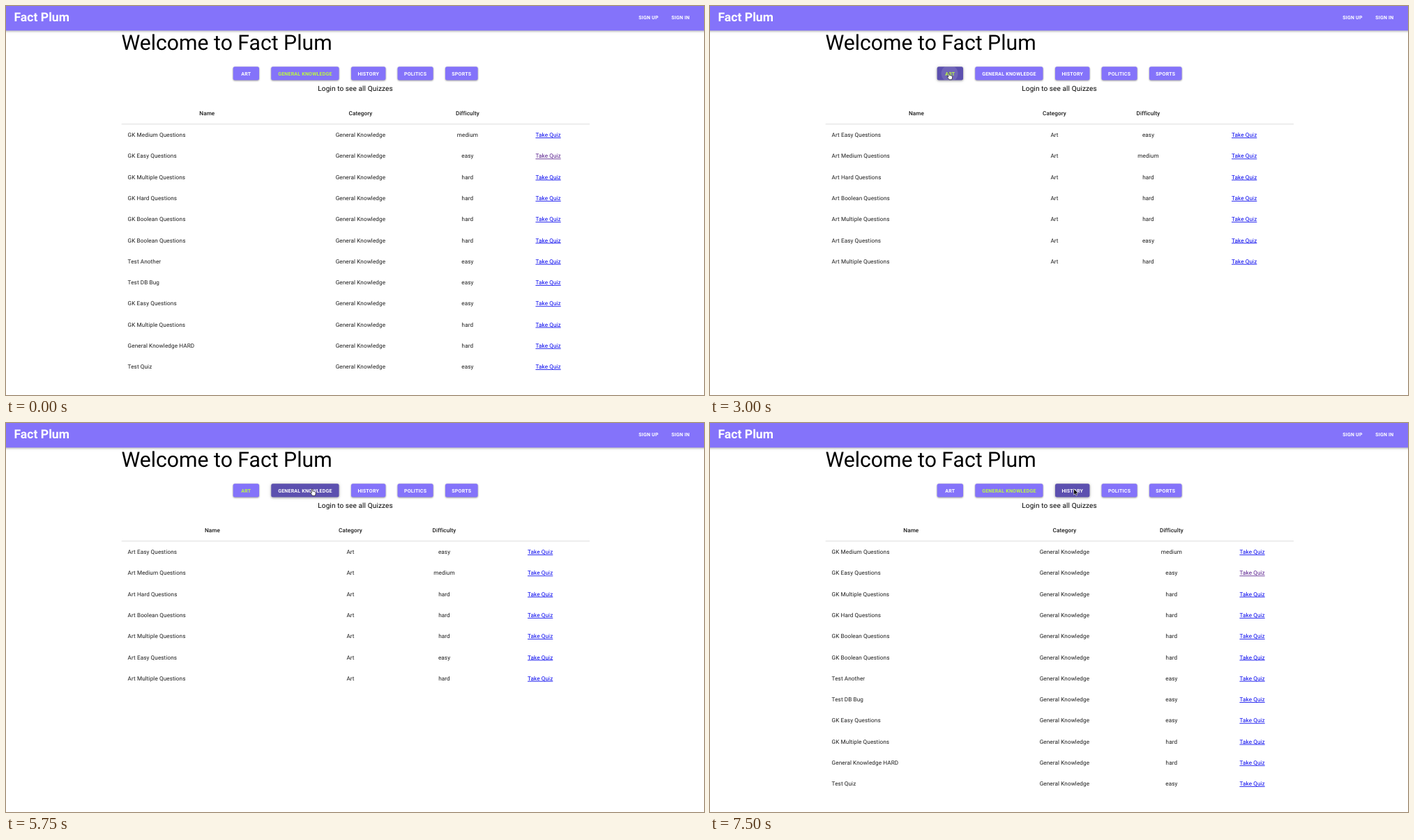
Recreate the animation shown at these times as an HTML page. Size 1001 px wide and 559 px high, loop 8000 ms.

```html
<!DOCTYPE html>
<html lang="en">
<head>
<meta charset="utf-8">
<title>Fact Plum</title>
<style>
  html, body { margin: 0; width: 100%; height: 100%; overflow: hidden; background: #fff; }
  svg { display: block; }
  text { font: 8.19px Roboto, sans-serif; letter-spacing: .088px; fill: #1c1c1c; text-rendering: geometricPrecision; }
  .mid { text-anchor: middle; }
  .th { font-weight: 500; }
  .link { fill: #00e; text-decoration: underline; }
  .seen { fill: #551a8b; }
  .brand { font-size: 17.6px; font-weight: 700; fill: #fff; letter-spacing: 0; }
  .title { font-size: 30.2px; fill: #000; letter-spacing: 0; }
  .note { font-size: 10.05px; fill: #000; letter-spacing: .094px; }
  .caps { font-size: 7.06px; font-weight: 700; fill: #fff; letter-spacing: .2px; }
  .on { fill: #bcfb40; }
  .bar { fill: #8473fa; filter: drop-shadow(0 1.4px 1.5px #0004) drop-shadow(0 .6px 2px #0002); }
  .btn { fill: #8473fa; filter: drop-shadow(0 1.2px .8px #0005) drop-shadow(0 .5px 1.2px #0002); }
  .fade { fill: #7062d5; }
  .hover { fill: #5c50af; filter: drop-shadow(0 1.8px 1.5px #0005) drop-shadow(0 .6px 2.5px #0002); }
</style>
</head>
<body>
<svg id="stage" width="1001" height="559" viewBox="0 0 1001 559"></svg>
<script>
const LOOP = 8000;
const stage = document.getElementById('stage');

// label, left edge, width
const buttons = [
  ['ART', 325.7, 37.3], ['GENERAL KNOWLEDGE', 380.3, 97.2], ['HISTORY', 495, 49.4],
  ['POLITICS', 561.6, 51], ['SPORTS', 630, 46.6]
];

const tables = [
  { category: 'Art', cols: [296, 494, 628.5, 766.2], seen: -1, rows: [
    'Art Easy Questions|easy', 'Art Medium Questions|medium', 'Art Hard Questions|hard',
    'Art Boolean Questions|hard', 'Art Multiple Questions|hard', 'Art Easy Questions|easy',
    'Art Multiple Questions|hard'] },
  { category: 'General Knowledge', cols: [288.3, 508.4, 661.9, 777.6], seen: 1, rows: [
    'GK Medium Questions|medium', 'GK Easy Questions|easy', 'GK Multiple Questions|hard',
    'GK Hard Questions|hard', 'GK Boolean Questions|hard', 'GK Boolean Questions|hard',
    'Test Another|easy', 'Test DB Bug|easy', 'GK Easy Questions|easy',
    'GK Multiple Questions|hard', 'General Knowledge HARD|hard', 'Test Quiz|easy'] }
];

const cursors = {
  arrow: '<path d="M0 0V8.7L2 6.9 3.3 9.9 4.8 9.3 3.5 6.4 6.2 6.2Z" stroke="#fff" stroke-width=".6"/>',
  hand: '<path d="M-.8 5.6V1.2Q-.8.3 0 .3T.8 1.2V3.8Q2.2 3.5 2.4 4.2 3.7 4 3.9 4.7 5.1 4.7 5.1 5.9 5.1 8.3 4.1 10H.4Q-.6 8.4-2.4 6.4-2.6 5.5-1.9 5.5T-.8 6.4Z" fill="#fff" stroke="#000" stroke-width=".6"/>'
};

// start time, cursor kind, x, y, hovered button, button style, ripple radius
const steps = [
  [0],
  [500, 'arrow', 546.4, 80.3],
  [750, 'arrow', 543.4, 89.3],
  [1000, 'arrow', 373.4, 139.3],
  [1250],
  [1500, 'arrow', 350.2, 108.9],
  [1750, 'arrow', 338.5, 98.4],
  [2500, 'arrow', 342.4, 96.4],
  [3000, 'hand', 342.6, 95.8, 0, 'hover', 12],
  [3250, 'hand', 342.6, 95.8, 0, 'hover'],
  [3500, 'arrow', 338.4, 123.3, 0, 'fade'],
  [3750, 'arrow', 337.6, 209.3],
  [4000, 'arrow', 337.4, 215.3],
  [4500, 'arrow', 417.4, 180.9],
  [4750, 'arrow', 427.4, 118.3],
  [5000, 'hand', 439.1, 95.6, 1, 'fade'],
  [5250, 'hand', 439.1, 95.6, 1, 'hover'],
  [5750, 'hand', 439.1, 94.4, 1, 'hover'],
  [6000, 'hand', 439.1, 94.4, 1, 'hover', 18],
  [6250, 'arrow', 475.4, 121.2, 1, 'fade'],
  [6500, 'arrow', 482.4, 149.3],
  [6750, 'arrow', 490.6, 150.2],
  [7250, 'arrow', 521.7, 94.6, 2, 'hover']
];

const text = (x, y, str, cls = '') => `<text x="${x}" y="${y}" class="${cls}">${str}</text>`;

function drawTable({ category, cols, seen, rows }) {
  const heads = ['Name', 'Category', 'Difficulty'];
  return heads.map((head, i) => text(cols[i], 157, head, 'mid th')).join('') +
    '<rect x="165.7" y="169.3" width="671.3" height=".9" fill="#dadada"/>' +
    rows.map((row, i) => {
      const [name, level] = row.split('|'), y = 188.1 + i * 30.28;
      return text(174.6, y, name) + text(cols[1], y, category, 'mid') + text(cols[2], y, level, 'mid') +
        text(cols[3], y, 'Take Quiz', 'mid link' + (i === seen ? ' seen' : ''));
    }).join('');
}

function drawButton([label, x, w], isActive, style, ripple) {
  return `<rect x="${x}" y="87.3" width="${w}" height="19.3" rx="2.5" class="btn ${style}"/>` +
    `<svg x="${x}" y="87.3" width="${w}" height="19.3">${ripple}</svg>` +
    text(x + w / 2, 99.5, label, 'mid caps' + (isActive ? ' on' : ''));
}

function draw([time, kind, x, y, hovered, style, radius]) {
  const active = time >= 3000 && time < 6000 ? 0 : 1;
  const menu = buttons.map((button, i) => {
    const isHovered = i === hovered;
    const ripple = isHovered && radius
      ? `<circle cx="${x + 1 - button[1]}" cy="9.7" r="${radius}" fill="#fff" opacity=".12"/>` : '';
    return drawButton(button, i === active, isHovered ? style : '', ripple);
  });
  stage.innerHTML =
    text(165.4, 63.3, 'Welcome to Fact Plum', 'title') +
    '<rect x="-5" y="-5" width="1011" height="40.3" class="bar"/>' +
    text(11.5, 22.2, 'Fact Plum', 'brand') +
    text(907.2, 18.7, 'SIGN UP', 'caps') + text(954.2, 18.7, 'SIGN IN', 'caps') +
    menu.join('') +
    text(501, 122.2, 'Login to see all Quizzes', 'mid note') +
    drawTable(tables[active]) +
    (kind ? `<g transform="translate(${x} ${y})">${cursors[kind]}</g>` : '');
}

let shown;
const start = performance.now();
function tick() {
  const time = (performance.now() - start) % LOOP;
  const step = steps.findLast(s => s[0] <= time);
  if (step !== shown) draw(shown = step);
  requestAnimationFrame(tick);
}
tick();
</script>
</body>
</html>
```
